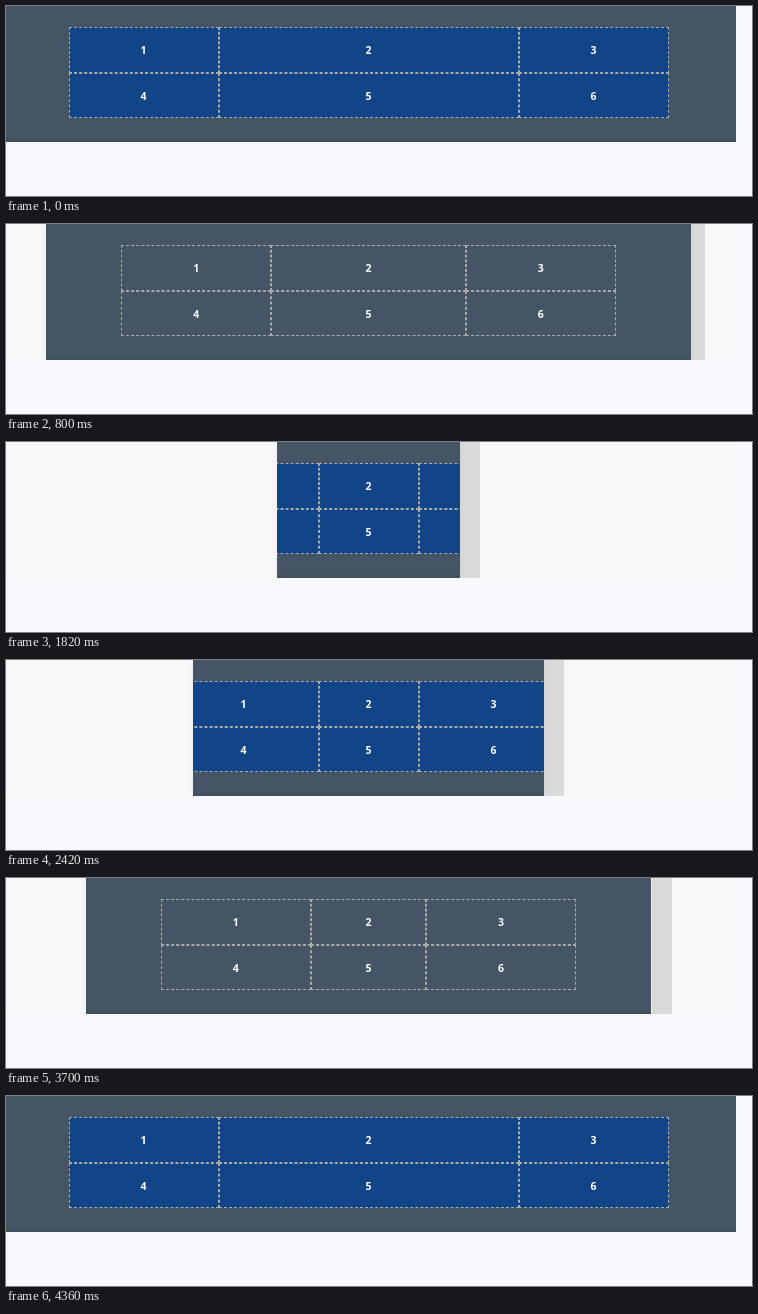
These frames come from a looping animation (746x190 px, 8 s). An HTML page:

```html
<!DOCTYPE html>
<html lang="en">
<head>
<meta charset="utf-8">
<title>Resizable grid</title>
<style>
  @property --w { syntax: "<number>"; inherits: true; initial-value: 756; }
  @property --gap { syntax: "<number>"; inherits: true; initial-value: 14; }

  html, body { margin: 0; width: 100%; height: 100%; overflow: hidden; background: #f8f9fc; }

  .view {
    position: absolute; left: 0; top: 0; width: 730px; height: 136px;
    overflow: hidden; background: #f8f8f8;
    animation: resize 8s linear infinite;
  }
  .panel, .handle { position: absolute; top: 0; height: 136px; }
  .panel {
    left: calc(362.5px - var(--w) * .5px); width: calc(var(--w) * 1px);
    overflow: hidden;
    background: linear-gradient(#0000 130px, #0001 136px) #455565;
    box-shadow: 0 0 7px #0000000d;
  }
  .handle {
    left: calc(362.5px + var(--w) * .5px); width: calc(var(--gap) * 1px);
    box-sizing: border-box; border-left: 1px solid #dadada; background: #dadada;
    animation: grip 8s step-end infinite;
  }
  .grid {
    --inner: clamp(400, var(--w) - 150, 600);
    position: absolute; top: 21px;
    left: calc((var(--w) - var(--inner)) * .5px); width: calc(var(--inner) * 1px);
    display: grid; grid-template: repeat(2, 45.5px) / 150px 1fr 150px;
  }
  /* Blue while the width sits at either limit */
  .grid::before {
    content: ""; position: absolute; inset: 0; background: #124488;
    opacity: clamp(0, max(var(--w) - 749, 551 - var(--w)), 1);
  }
  .grid span {
    position: relative; box-sizing: border-box; padding-top: .6px;
    display: flex; align-items: center; justify-content: center;
    border: 1px dashed #a9a9a9; color: #fff;
    font: 700 10.5px "Open Sans", "Noto Sans", sans-serif;
  }

  @keyframes resize {
    0% { --w: 756; --gap: 14; }
    6.25% { --w: 756; --gap: 14; animation-timing-function: cubic-bezier(.4, .3, .67, .55); }
    10% { --w: 645; --gap: 14; }
    15.25% { --w: 427; --gap: 17; }
    16.25% { --w: 386; --gap: 18; animation-timing-function: cubic-bezier(.33, .42, .6, .8); }
    22.75% { --w: 183; --gap: 20; }
    24.75% { --w: 183; --gap: 20; animation-timing-function: cubic-bezier(.3, .2, .6, .9); }
    34.75% { --w: 443; --gap: 20; }
    41.5% { --w: 443; --gap: 20; }
    46.25% { --w: 565; --gap: 21; }
    51.5% { --w: 672; --gap: 20; }
    54.5%, 100% { --w: 756; --gap: 20; }
  }
  @keyframes grip {
    0% { background-color: #dadada; border-color: #dadada; }
    35.75% { background-color: #e4e4e4; border-color: #e4e4e4; }
    41.5% { background-color: #dadada; border-color: #f4f4f4; }
    54.5%, 100% { background-color: #dadada; border-color: #dadada; }
  }
</style>
</head>
<body>
<div class="view">
  <div class="handle"></div>
  <div class="panel">
    <div class="grid">
      <span>1</span><span>2</span><span>3</span>
      <span>4</span><span>5</span><span>6</span>
    </div>
  </div>
</div>
</body>
</html>
```
